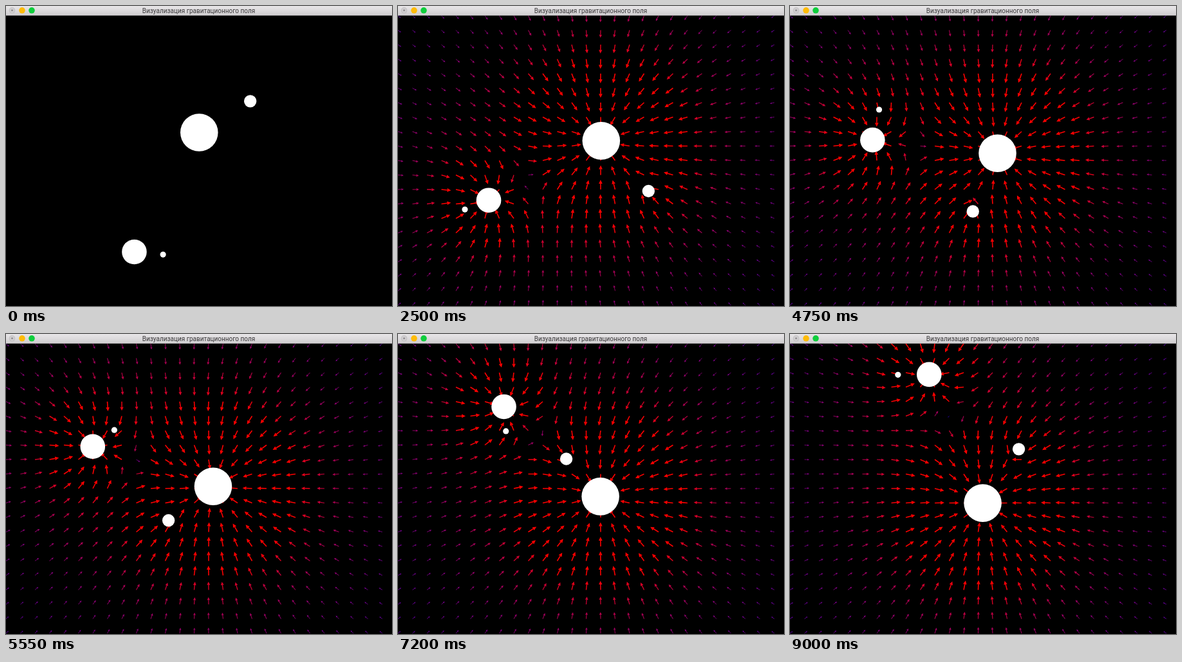
Write an HTML page with a canvas that moves like this. It is 600 by 466 pixels and loops after 9.05 s.

```html
<!DOCTYPE html>
<html lang="ru">
<head>
<meta charset="utf-8">
<title>Визуализация гравитационного поля</title>
<style>
  html, body { margin: 0; width: 100%; height: 100%; overflow: hidden; background: #000; }
  canvas { display: block; }
</style>
</head>
<body>
<canvas id="stage" width="600" height="466"></canvas>
<script>
const ctx = document.getElementById('stage').getContext('2d');
const LOOP = 9050, STEP = 50, FIELD_START = 1400;
const GRID = 22.5, BAR = 15, MAX_ARROW = 15, FULL_FIELD = 20;

const RAD = Math.PI / 180;
const sin = degrees => Math.sin(degrees * RAD);
const cos = degrees => Math.cos(degrees * RAD);
const polar = (r, angle) => ({ x: r * cos(angle), y: r * sin(angle) });

// Relative orbits: a mean ellipse plus a swing between near and far point
function starFromPlanet(t) {
  const phase = 20 * (t - 4.1);
  return polar(213.8 - 19 * cos(phase), -53.3 + 12.5 * t + 8.2 * sin(phase - 13));
}

function dwarfFromStar(t) {
  const phase = 43 * (t - 6.75);
  return polar(95.7 - 15 * cos(phase) - 3.4 * cos(2 * phase),
    -48.4 + 37.45 * t + 16 * sin(phase - 4) + 3.6 * sin(2 * phase));
}

function moonFromPlanet(t) {
  const u = t - 6.6;
  const swing = 4.6 + 2.6 * cos(27 * u); // the star's tide makes the swing beat
  return polar(42.9 - swing * cos(80 * u), 6.1 + 59.52 * t + 2 * swing * sin(80 * u));
}

function bodiesAt(t) {
  const s = starFromPlanet(t), d = dwarfFromStar(t), m = moonFromPlanet(t);
  // The common centre of mass drifts evenly
  const x = 281.7 + 0.26 * t - 0.02 * d.x + 0.2 * s.x;
  const y = 232.6 - 1.29 * t - 0.02 * d.y + 0.2 * s.y;
  return [
    { x, y, r: 29.3, mass: 357000 },
    { x: x - s.x, y: y - s.y, r: 19.3, mass: 88000 },
    { x: x + d.x, y: y + d.y, r: 9.7, mass: 9000 },
    { x: x - s.x + m.x, y: y - s.y + m.y, r: 4.6, mass: 1000 }
  ];
}

function disc(x, y, r, color) {
  ctx.fillStyle = color;
  ctx.beginPath();
  ctx.arc(x, y, r, 0, 2 * Math.PI);
  ctx.fill();
}

function arrow(x, y, gx, gy) {
  const k = Math.min(1, Math.hypot(gx, gy) / FULL_FIELD) ** 0.55;
  const length = MAX_ARROW * k, head = length * 0.4, half = length * 0.19;
  ctx.save();
  ctx.translate(x, y);
  ctx.rotate(Math.atan2(gy, gx));
  ctx.strokeStyle = ctx.fillStyle = `rgb(${255 * k}, 0, ${255 * (1 - k)})`;
  ctx.lineWidth = Math.max(0.8, length * 0.105);
  ctx.beginPath();
  ctx.moveTo(0, 0);
  ctx.lineTo(length - head, 0);
  ctx.stroke();
  ctx.beginPath();
  ctx.moveTo(length, 0);
  ctx.lineTo(length - head, -half);
  ctx.lineTo(length - head, half);
  ctx.fill();
  ctx.restore();
}

function drawField(bodies) {
  for (let x = 0; x < 600; x += GRID) {
    for (let y = BAR; y < 466; y += GRID) {
      let gx = 0, gy = 0;
      for (const b of bodies) {
        const dx = b.x - x, dy = b.y - y, d = Math.hypot(dx, dy) + 0.01;
        gx += b.mass * dx / d ** 3;
        gy += b.mass * dy / d ** 3;
      }
      arrow(x, y, gx, gy);
    }
  }
}

function drawTitleBar() {
  const shade = ctx.createLinearGradient(0, 0, 0, BAR);
  shade.addColorStop(0, '#e8e6e8');
  shade.addColorStop(1, '#cfcdcf');
  ctx.fillStyle = shade;
  ctx.fillRect(0, 0, 600, BAR - 1);
  ctx.fillStyle = '#aaa8aa';
  ctx.fillRect(0, BAR - 1, 600, 1);
  disc(9.5, 6.8, 4.8, '#bdbbbd');
  disc(9.5, 6.8, 4.2, '#cfcdcf');
  disc(9.5, 6.8, 1.3, '#858385');
  disc(25, 6.8, 4.8, '#fdbb09');
  disc(40, 6.8, 4.8, '#0fce3c');
  ctx.fillStyle = '#3a383a';
  ctx.font = '10px Roboto, "Liberation Sans", sans-serif';
  ctx.textAlign = 'center';
  ctx.fillText('Визуализация гравитационного поля', 299.5, 10.5);
}

const start = performance.now();
function frame() {
  const elapsed = Math.max(0, performance.now() - start) % LOOP;
  const time = Math.floor(elapsed / STEP) * STEP;
  const bodies = bodiesAt(time / 1000);
  ctx.fillStyle = '#000';
  ctx.fillRect(0, 0, 600, 466);
  if (time >= FIELD_START) drawField(bodies);
  for (const b of bodies) disc(b.x, b.y, b.r, '#fff');
  drawTitleBar();
  requestAnimationFrame(frame);
}
frame();
</script>
</body>
</html>
```
